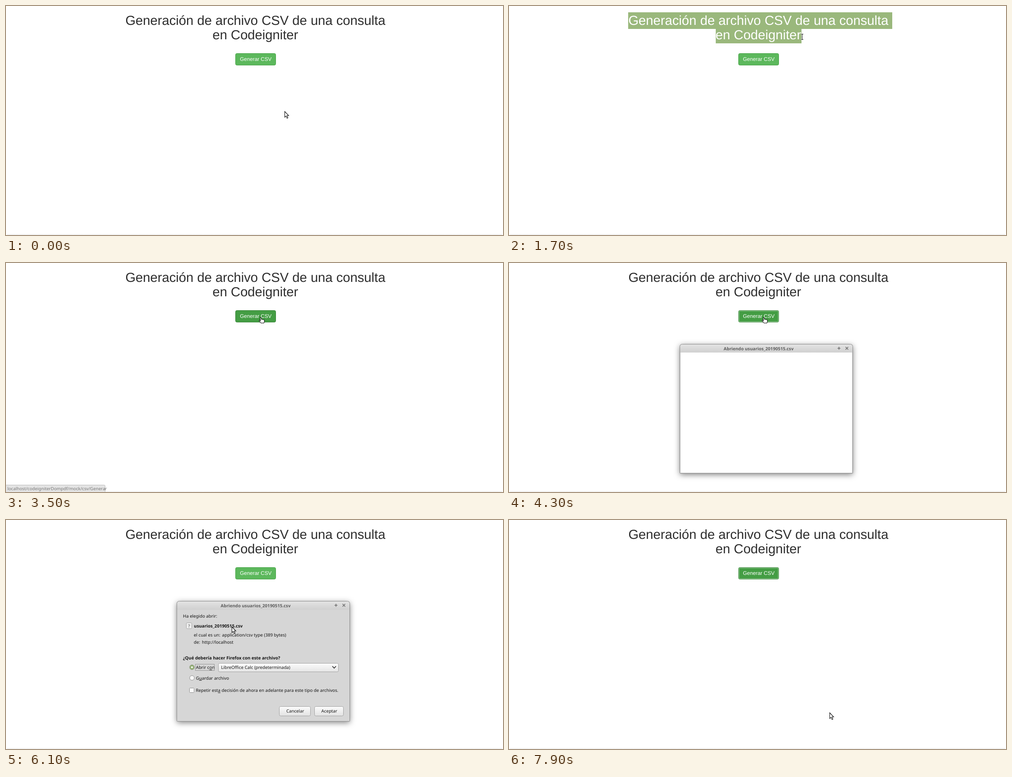
Recreate the animation shown at these times as an HTML page with a canvas. Size 1101 by 509 pixels, loop 8 s.

```html
<!DOCTYPE html>
<html lang="es">
<head>
<meta charset="utf-8">
<title>Generación de archivo CSV</title>
<style>
  html, body { margin: 0; width: 100%; height: 100%; overflow: hidden; background: #fff; }
  canvas { display: block; }
</style>
</head>
<body>
<canvas width="1101" height="509"></canvas>
<script>
const ctx = document.querySelector('canvas').getContext('2d');
const LOOP = 8000, TICK = 100;
const HEADING = '29.2px "Liberation Sans", Arial, sans-serif';
const BUTTON = '11.7px "Liberation Sans", Arial, sans-serif';
const UI = '9.7px "Noto Sans", sans-serif';
const UI_BOLD = 'bold 9.7px "Noto Sans", sans-serif';
const INK = '#141414';

const ARROW = new Path2D('M.5 .5V13.2L3.4 10.6L5.5 15.6L7.6 14.7L5.5 9.8H9.3Z');
const HAND = new Path2D('M3 1.7Q4 0 5.3 1.7L5.8 5L11 6Q13 6.5 12.5 9L11.5 13.5H5L1 9Q.5 7.3 2 7.4L3.7 8.6Z');
const IBEAM = new Path2D('M-2.5 -6H2.5M-2.5 6H2.5M0 -6V6');

// Pointer moves: first tick, number of ticks, destination
const START = [617, 234];
const MOVES = [
  [100, 1, 615, 232], [400, 9, 261, 36], [1300, 1, 584, 37], [1400, 6, 657, 72],
  [2200, 5, 635, 106], [3500, 1, 560, 120], [4800, 1, 530, 109], [5200, 1, 421, 284],
  [5700, 1, 438, 239], [6100, 1, 500, 237], [6600, 1, 600, 345],
  [7000, 1, 712, 437], [7400, 1, 710, 428]
];

const within = (t, from, to) => t >= from && t < to;

function text(str, x, y, font, color = INK, align = 'left') {
  ctx.font = font;
  ctx.fillStyle = color;
  ctx.textAlign = align;
  ctx.fillText(str, x, y);
}

function box(x, y, w, h, radius, fill, stroke) {
  ctx.beginPath();
  ctx.roundRect(x + .5, y + .5, w - 1, h - 1, radius);
  if (fill) { ctx.fillStyle = fill; ctx.fill(); }
  if (stroke) { ctx.strokeStyle = stroke; ctx.lineWidth = 1; ctx.stroke(); }
}

function shade(y, h, top, bottom) {
  const g = ctx.createLinearGradient(0, y, 0, y + h);
  g.addColorStop(0, top);
  g.addColorStop(1, bottom);
  return g;
}

function lines(path, color, width) {
  ctx.strokeStyle = color;
  ctx.lineWidth = width;
  ctx.stroke(new Path2D(path));
}

function headingText(color) {
  text('Generación de archivo CSV de una consulta', 552.4, 42, HEADING, color, 'center');
  text('en Codeigniter', 552.4, 74, HEADING, color, 'center');
}

function heading(t) {
  headingText('#2e2e2e');
  if (!within(t, 1300, 3500)) return;
  const end = [505, 620, 690][Math.floor((t - 1300) / TICK)] ?? 849;
  const selection = new Path2D();
  selection.rect(264, 14, end - 264, 37);
  if (end === 849) selection.rect(458, 51, 190, 32);
  ctx.save();
  ctx.fillStyle = '#9ab87c';
  ctx.fill(selection);
  ctx.clip(selection);
  headingText('#fff');
  ctx.restore();
}

function generateButton(t) {
  const focused = within(t, 4300, 4800) || t >= 7900;
  const dark = focused || within(t, 3500, 5200);
  box(508, 105, 90, 27, 3, dark ? '#449d44' : '#5cb85c', dark ? '#398439' : '#47a447');
  if (focused) box(509, 106, 88, 25, 2, null, '#a9d3a9');
  text('Generar CSV', 553.3, 122.3, BUTTON, '#fff', 'center');
}

function statusBar(t) {
  const fading = within(t, 4800, 5200);
  if (!fading && !within(t, 3500, 4300)) return;
  ctx.save();
  ctx.globalAlpha = fading ? .07 : 1;
  box(-2, 493, 222, 18, 2, '#e4e4e4', '#bbb');
  text('localhost/codeigniterDompdf/mock/csv/Generar', 3, 505, UI, t < 3900 ? '#777' : '#333');
  ctx.restore();
}

function label(str, x, y, mnemonic) {
  text(str, x, y, UI);
  const left = x + ctx.measureText(str.slice(0, mnemonic)).width;
  ctx.fillRect(left, y + 1.5, ctx.measureText(str[mnemonic]).width, 1);
}

function radio(y, selected) {
  ctx.beginPath();
  ctx.arc(412, y, 5.2, 0, 7);
  ctx.fillStyle = '#f8f8f8';
  ctx.fill();
  ctx.strokeStyle = selected ? '#66784f' : '#8e8e8e';
  ctx.lineWidth = 1;
  ctx.stroke();
  if (!selected) return;
  ctx.beginPath();
  ctx.arc(412, y, 3.3, 0, 7);
  ctx.strokeStyle = '#8fae6e';
  ctx.lineWidth = 2.4;
  ctx.stroke();
}

function dialogButton(str, x, w) {
  box(x, 414, w, 22, 3, shade(414, 22, '#fcfcfc', '#e2e2e2'), '#a2a2a2');
  text(str, x + w / 2 + .7, 428.2, UI, INK, 'center');
}

function dialogContent(t) {
  text('Ha elegido abrir:', 392, 216.5, UI);
  box(399, 228, 13, 14, 2, '#eee', '#a5a5a5');
  text('?', 405.5, 239, UI_BOLD, '#858585', 'center');
  text('usuarios_20190515.csv', 416.3, 238.5, UI_BOLD);
  text('el cual es un:', 416, 258.5, UI);
  text('application/csv type (389 bytes)', 478.5, 258.5, UI);
  text('de:', 416, 275, UI);
  text('http://localhost', 434, 275, UI);
  text('¿Qué debería hacer Firefox con este archivo?', 392, 310, UI_BOLD);

  radio(327.3, true);
  label('Abrir con', 420.7, 331, 7);
  ctx.setLineDash([1, 1]);
  box(419, 320, 43, 15, 0, null, '#555');
  ctx.setLineDash([]);
  radio(351, false);
  label('Guardar archivo', 420.7, 354.5, 1);

  box(470, 318, 267, 20, 3, shade(318, 20, '#fcfcfc', '#e4e4e4'), '#a2a2a2');
  text('LibreOffice Calc (predeterminada)', 476.5, 331, UI, within(t, 6600, 7000) ? '#444' : INK);
  lines('M723 325L727 329.3L731 325', '#333', 1.8);

  box(406, 373, 11, 11, 1, '#fafafa', '#8e8e8e');
  label('Repetir esta decisión de ahora en adelante para este tipo de archivos.', 420.5, 382, 11);

  dialogButton('Cancelar', 605, 70);
  dialogButton('Aceptar', 683, 65);
}

function dialog(t) {
  if (!within(t, 4300, 7900)) return;
  const loading = t < 4800;
  const height = loading ? 288 : 268;
  ctx.save();
  ctx.shadowColor = 'rgba(0,0,0,.5)';
  ctx.shadowBlur = 13;
  ctx.shadowOffsetY = 3;
  box(378, 180, 384, height, [5, 5, 1, 1], '#d6d6d6');
  ctx.restore();
  box(378, 180, 384, 20, [5, 5, 0, 0], shade(180, 19, '#e4e4e4', '#d0d0d0'));
  box(378, 180, 384, height, [5, 5, 1, 1], null, '#8c8c8c');
  text('Abriendo usuarios_20190515.csv', 553, 193.6, UI_BOLD, '#5c5c5c', 'center');
  lines('M727.7 189.5H734.3M731 186.2V192.8M745.5 186.5L751.5 192.5M751.5 186.5L745.5 192.5', '#6c6c6c', 1.5);
  if (loading) {
    ctx.fillStyle = '#fff';
    ctx.fillRect(380, 199, 380, 267);
  } else {
    dialogContent(t);
  }
}

function pointerAt(t) {
  let [x, y] = START;
  for (const [at, ticks, toX, toY] of MOVES) {
    if (t < at) break;
    const k = Math.min(1, (Math.floor((t - at) / TICK) + 1) / ticks);
    const eased = 1 - (1 - k) ** 2;
    x += (toX - x) * eased;
    y += (toY - y) * eased;
  }
  return [Math.round(x), Math.round(y)];
}

function pointer(t) {
  const [x, y] = pointerAt(t);
  ctx.save();
  ctx.translate(x, y);
  if (y < 85) {
    ctx.translate(.5, .5);
    ctx.lineWidth = 3;
    ctx.strokeStyle = '#fff';
    ctx.stroke(IBEAM);
    ctx.lineWidth = 1;
    ctx.strokeStyle = '#111';
    ctx.stroke(IBEAM);
  } else {
    const shape = within(t, 3500, 5200) ? HAND : ARROW;
    ctx.fillStyle = '#fff';
    ctx.fill(shape);
    ctx.lineWidth = 1.1;
    ctx.strokeStyle = '#111';
    ctx.stroke(shape);
  }
  ctx.restore();
}

function draw() {
  const t = performance.now() % LOOP;
  ctx.textRendering = 'geometricPrecision';
  ctx.fillStyle = '#fff';
  ctx.fillRect(0, 0, 1101, 509);
  ctx.fillStyle = shade(506, 3, '#fff', '#ececec');
  ctx.fillRect(2, 506, 1097, 3);
  heading(t);
  generateButton(t);
  statusBar(t);
  dialog(t);
  pointer(t);
  requestAnimationFrame(draw);
}
draw();
</script>
</body>
</html>
```
